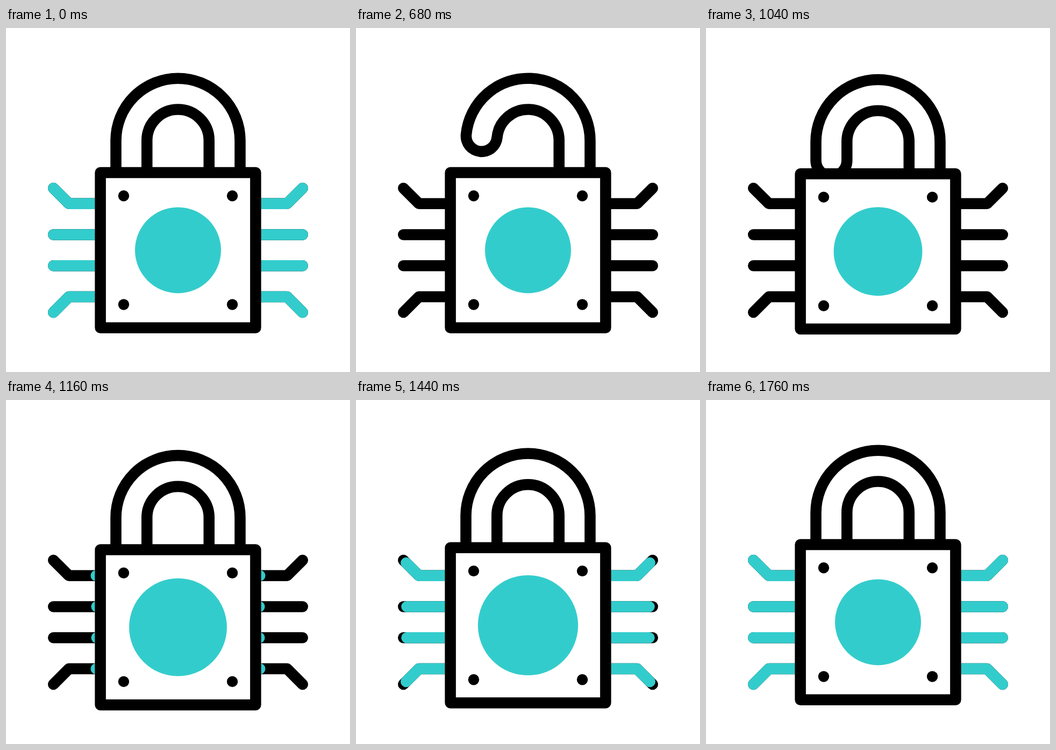
An HTML page for the animation above (2000 ms loop, 640 by 640 pixels).

```html
<!DOCTYPE html>
<html lang="en">
<head>
<meta charset="utf-8">
<title>Padlock chip</title>
<style>
  html, body { margin: 0; width: 100%; height: 100%; overflow: hidden; background: #fff; }
  svg { display: block; width: 100vw; height: 100vh; }
</style>
</head>
<body>
<svg viewBox="0 0 640 640" fill="none" stroke="#000" stroke-width="20.5"
     stroke-linecap="round" stroke-linejoin="round">
  <g id="wires"></g>
  <g id="lock">
    <path class="shackle" stroke-width="78.3"/>
    <path class="shackle" stroke="#fff" stroke-width="37.2"/>
    <rect x="175.6" y="269" width="288.8" height="288.8" fill="#fff"/>
    <g id="dots" fill="#000" stroke="none"></g>
    <circle id="mark" cx="320" cy="413.4" fill="#33cccc" stroke="none"/>
  </g>
</svg>
<script>
const LOOP = 2000, TEAL = '#33cccc';
const CX = 320, MID = 413.4, U = 28.88;  // body centre and layout unit
const CY = 209.2, R = 3 * U;             // shackle arc
const LEG = 291, OPEN = 201;             // shackle end, closed and open
const DROP = 11.7, GROW = 0.216, MARK_R = 80;

const $ = id => document.getElementById(id);
const lock = $('lock'), mark = $('mark');
const shackle = document.querySelectorAll('.shackle');

function add(parent, tag, attrs) {
  const el = document.createElementNS('http://www.w3.org/2000/svg', tag);
  for (const k in attrs) el.setAttribute(k, attrs[k]);
  return parent.appendChild(el);
}

// Smooth 0..1 ramp between two times
function ease(t, from, to) {
  const x = Math.min(1, Math.max(0, (t - from) / (to - from)));
  return x * x * (3 - 2 * x);
}

// Each wire runs from the body outward to its tip
const wires = [];
for (const side of [-1, 1]) {
  const x = d => CX + side * d;
  for (const [row, tip] of [[-3, -4], [-1, -1], [1, 1], [3, 4]]) {
    const y = MID + row * U;
    const pts = [[x(5 * U), y], [x(202.9), y], [x(231.8), MID + tip * U]];
    const d = 'M' + pts.map(p => p.join()).join('L');
    add($('wires'), 'path', { d });
    const el = add($('wires'), 'path', { d, stroke: TEAL });
    wires.push({ el, len: el.getTotalLength() });
  }
}

for (const i of [-1, 1])
  for (const j of [-1, 1])
    add($('dots'), 'circle', { cx: CX + i * 3.5 * U, cy: MID + j * 3.5 * U, r: 10.2 });

// Show the part of each teal wire between fractions a and b
function trim(a, b) {
  for (const { el, len } of wires) {
    el.style.display = b - a > 0.0005 ? '' : 'none';
    el.setAttribute('stroke-dasharray', `${(b - a) * len} ${len * 3}`);
    el.setAttribute('stroke-dashoffset', -a * len);
  }
}

function shacklePath(end) {
  const turn = Math.max(0, CY - end) / R;
  const x = CX - R * Math.cos(turn), y = CY - R * Math.sin(turn);
  const leg = end > CY ? `M${x},${end}L` : 'M';
  return `${leg}${x},${y}A${R},${R} 0 0 1 ${CX + R},${CY}V${LEG}`;
}

function draw(t) {
  if (t < 800) trim(ease(t, 95, 599), 1);
  else trim(0, ease(t, 1088, 1510));

  const open = ease(t, 80, 667) - ease(t, 808, 1285);
  const d = shacklePath(LEG + (OPEN - LEG) * open);
  shackle.forEach(p => p.setAttribute('d', d));

  const drop = DROP * (ease(t, 961, 1241) - ease(t, 1300, 1580));
  lock.setAttribute('transform', `translate(0 ${drop})`);

  const grow = ease(t, 961, 1300) - ease(t, 1300, 1745);
  mark.setAttribute('r', MARK_R * (1 + GROW * grow));
}

const start = performance.now();
function tick() {
  draw((performance.now() - start) % LOOP);
  requestAnimationFrame(tick);
}
draw(0);
requestAnimationFrame(tick);
</script>
</body>
</html>
```
